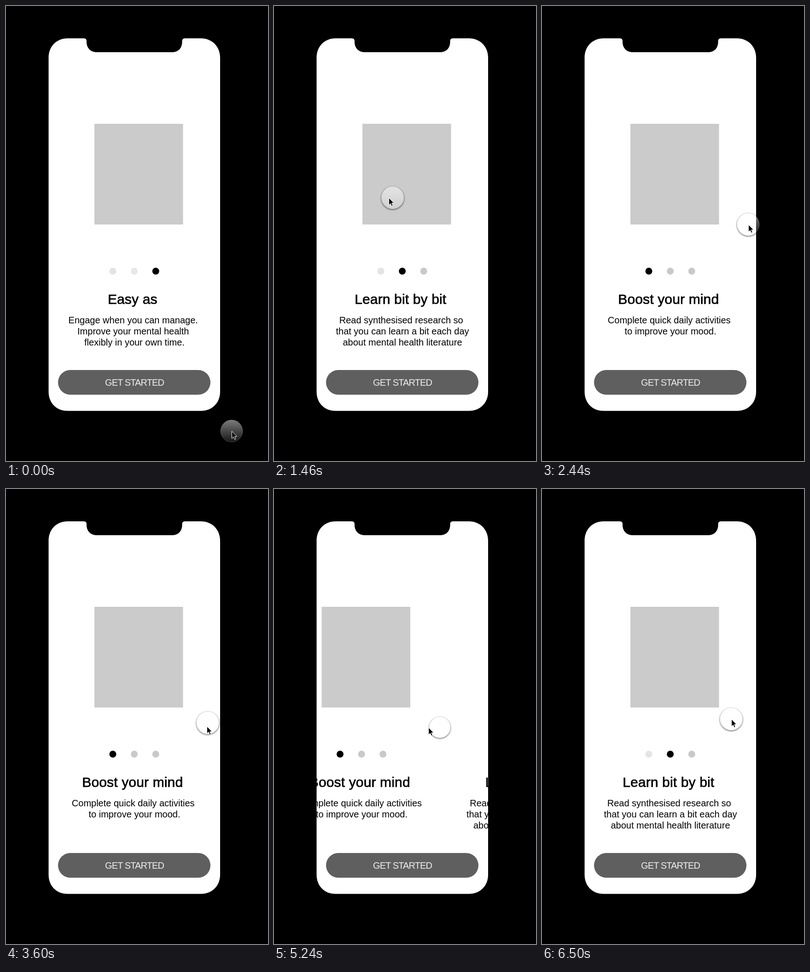
An HTML page that plays this animation: 569x985 px, repeating every 8 s.

```html
<!DOCTYPE html>
<html lang="en">
<head>
<meta charset="utf-8">
<title>Onboarding swipe</title>
<style>
  html, body { margin: 0; width: 100%; height: 100%; overflow: hidden; background: #000; }
  svg { display: block; width: 100%; height: 100%; }
  text { font-family: "Liberation Sans", Arial, sans-serif; font-size: 20px; text-anchor: middle; white-space: pre; }
  .title { font-size: 30px; letter-spacing: .15px; stroke: #000; stroke-width: .7px; }
  .label { letter-spacing: -.9px; fill: #eee; }
</style>
</head>
<body>
<svg viewBox="0 0 569 985">
  <defs>
    <clipPath id="screen"><use href="#phone"/></clipPath>
    <linearGradient id="glass" x1="0" y1="0" x2="0" y2="1">
      <stop offset="0" stop-color="#fff" stop-opacity=".48"/>
      <stop offset="1" stop-color="#fff" stop-opacity=".09"/>
    </linearGradient>
    <radialGradient id="shade" gradientUnits="userSpaceOnUse" cx="0" cy="1.5" r="28">
      <stop offset=".8" stop-opacity=".45"/>
      <stop offset=".92" stop-opacity=".15"/>
      <stop offset="1" stop-opacity="0"/>
    </radialGradient>
  </defs>
  <rect width="569" height="985"/>
  <path id="phone" fill="#fff" d="M134 70H169Q175 70 175 76V78C175 91 184 100 197 100H361
    C374 100 382.5 91 382.5 78V76Q382.5 70 388.5 70H423C448 70 465 88 465 112V835
    C465 859 448 876.5 423 876.5H134C109 876.5 92.5 859 92.5 835V112C92.5 88 109 70 134 70Z"/>
  <g id="pages" clip-path="url(#screen)"></g>
  <rect x="113" y="788" width="331" height="53.5" rx="26.75" fill="#5f5f5f"/>
  <text class="label" x="279" y="822">GET STARTED</text>
  <g id="touch">
    <circle r="26.2" fill="none" stroke="url(#shade)" stroke-width="4"/>
    <circle r="23.8" fill="url(#glass)" stroke="#fff" stroke-opacity=".25"/>
  </g>
  <path id="arrow" stroke="#fff" d="M0 0V15.5L3.6 12.2L6 17.8L8.6 16.7L6.2 11.3H11Z"/>
</svg>
<script>
const LOOP = 8000, WIDTH = 372, LAG = 20;
const $ = id => document.getElementById(id);

const pages = [
  { title: 'Easy as', dots: ['#e4e4e4', '#e3e9ec', '#000'],
    lines: ['Engage when you can manage. ', 'Improve your mental health ', 'flexibly in your own time.'] },
  { title: 'Learn bit by bit', dots: ['#e4e4e4', '#000', '#c9c9c9'],
    lines: ['Read synthesised research so ', 'that you can learn a bit each day', 'about mental health literature'] },
  { title: 'Boost your mind', dots: ['#000', '#c9c9c9', '#c9c9c9'],
    lines: ['Complete quick daily activities ', 'to improve your mood.'] }
];

$('pages').innerHTML = pages.map(({ title, dots, lines }) => `<g>
  <rect x="192" y="255" width="192.5" height="218" fill="#cbcbcb"/>
  ${dots.map((c, i) => `<circle cx="${232 + i * 46.6}" cy="574" r="7.5" fill="${c}"/>`).join('')}
  <text class="title" x="279" y="645">${title} </text>
  ${lines.map((s, i) => `<text x="279" y="${687 + i * 24}">${s}</text>`).join('')}
</g>`).join('');
const pageNodes = [...$('pages').children];

// Eased progress from start to end, held at 0 and 1 outside.
function ease(t, start, end) {
  const u = Math.min(1, Math.max(0, (t - start) / (end - start)));
  return u * u * (3 - 2 * u);
}

// Each move goes on from where the one before it ended; sag bows it downwards.
const moves = [
  { from: 130, to: 430, x: 294, y: 442 },
  { from: 620, to: 790, x: 240, y: 415 },
  { from: 800, to: 980, x: 317, y: 415 },
  { from: 1020, to: 1160, x: 447, y: 415 },
  { from: 1180, to: 1490, x: 244, y: 415 },
  { from: 1690, to: 1870, x: 465, y: 417 },
  { from: 2150, to: 2430, x: 448, y: 473 },
  { from: 3410, to: 4200, x: 366, y: 748 },
  { from: 4270, to: 4990, x: 429, y: 516 },
  { from: 5130, to: 5350, x: 244, y: 516 },
  { from: 5610, to: 6270, x: 411, y: 498, sag: 117 }
];

function pointer(t) {
  let x = 490, y = 920;
  for (const m of moves) {
    const e = ease(t, m.from, m.to);
    x += (m.x - x) * e;
    y += (m.y - y) * e + (m.sag || 0) * Math.sin(Math.PI * e);
  }
  return [x, y];
}

// Drag a little way and pause, then swipe two pages on and one back.
const scroll = t => 76 * ease(t, 800, 980) + (WIDTH - 76) * ease(t, 1020, 1420)
  + WIDTH * (ease(t, 1690, 1960) - ease(t, 5130, 5480));

const drags = [[800, 1160], [1690, 1870], [5130, 5350]];

const place = (node, x, y, size = 1) =>
  node.setAttribute('transform', `translate(${x} ${y}) scale(${size})`);

function draw(t) {
  const pos = scroll(t);
  const [x, y] = pointer(t);
  const pressed = drags.some(([from, to]) => t >= from && t < to);
  pageNodes.forEach((g, i) => place(g, pos - i * WIDTH, 0));
  place($('touch'), ...pointer(t - LAG), pressed ? .94 : 1);
  place($('arrow'), x + .5, y + .5);
}

function tick() {
  draw(performance.now() % LOOP);
  requestAnimationFrame(tick);
}
tick();
</script>
</body>
</html>
```
